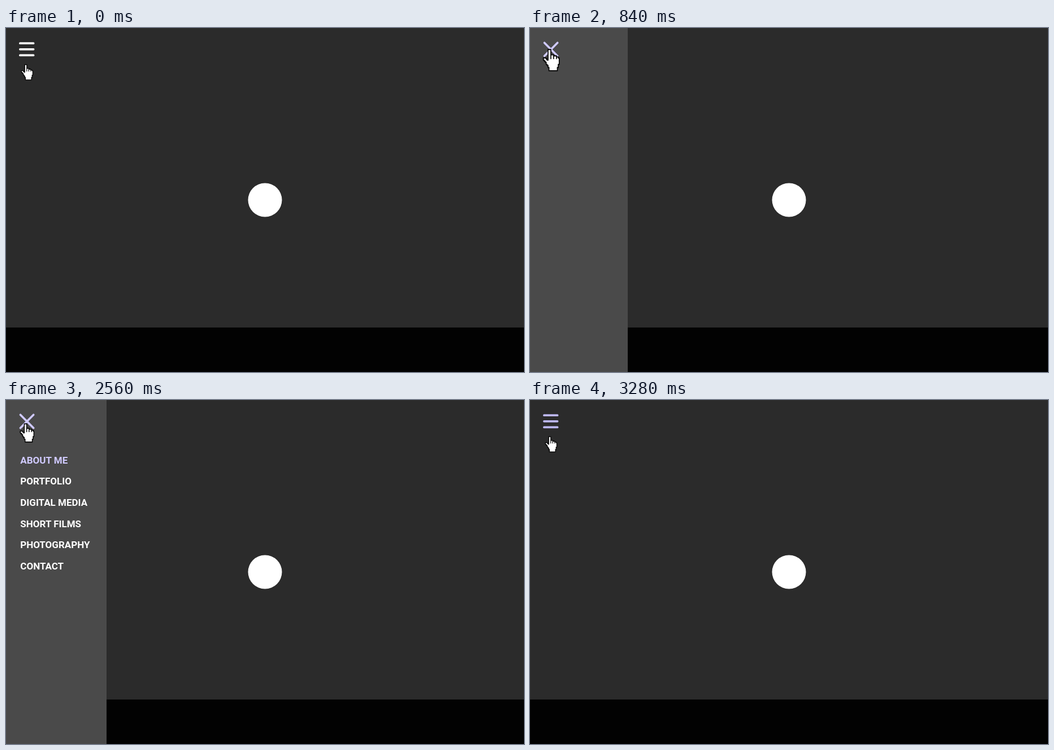
Write an HTML page that moves like this. It is 917x611 px and loops after 3.32 s.

```html
<!DOCTYPE html>
<html lang="en">
<head>
<meta charset="utf-8">
<title>Slide-out menu</title>
<style>
  html, body { margin: 0; width: 100%; height: 100%; overflow: hidden; background: #2b2b2b; }
  svg { display: block; width: 100vw; height: 100vh; }
  text { font: 600 17px Roboto, Inter, sans-serif; fill: #fff; }
</style>
</head>
<body>
<svg viewBox="0 0 917 611">
  <defs><clipPath id="clip"><rect id="clipRect" height="611"/></clipPath></defs>
  <rect width="917" height="611" fill="#2b2b2b"/>
  <rect y="532" width="917" height="79" fill="#020202"/>
  <circle cx="458.5" cy="305.5" r="30" fill="#fff"/>
  <rect id="panel" height="611" fill="#4a4a4a"/>
  <g id="menu" clip-path="url(#clip)"></g>
  <path id="icon" fill="none" stroke-width="3.7" stroke-linecap="round"/>
  <g id="cursor" stroke="#000" fill="#fff">
    <path d="M5 1H8V6H11V7H14V8H16V9H17V15H16V18H15V21H6V18H5V16H4V15H3V13H2V12H1V11H0V9H3V10H4V11H5Z"/>
    <path d="M8 6V10M11 7V10M14 8V10" fill="none"/>
  </g>
</svg>
<script>
const LOOP = 3320, STEP = 40;
const OPEN = 800, HOVER = 1240, CLOSED = 2840;
const WHITE = '#fff', LILAC = '#d0caff', LILAC_BAR = '#bdb8f4';
const BARS = [0, 1, 2].map(i => `M24.9 ${27.2 + 10.6 * i}h23.7`).join('');
const CROSS = 'M25.5 26.3l23.2 23.4m0 -23.4l-23.2 23.4';
const ITEMS = ['ABOUT ME', 'PORTFOLIO', 'DIGITAL MEDIA', 'SHORT FILMS', 'PHOTOGRAPHY', 'CONTACT'];

const $ = id => document.getElementById(id);
const phase = (t, from, to) => Math.min(1, Math.max(0, (t - from) / (to - from)));
const smooth = k => k * k * (3 - 2 * k);
const accelerate = k => k ** 1.7;
const ramp = (t, from, to) => smooth(phase(t, from, to));

// Eases up to 1, holds, then eases back to 0.
const pulse = (t, riseFrom, riseTo, fallFrom, fallTo) =>
  ramp(t, riseFrom, riseTo) - ramp(t, fallFrom, fallTo);

const labels = ITEMS.map((label, i) => {
  const node = document.createElementNS('http://www.w3.org/2000/svg', 'text');
  node.textContent = label;
  node.setAttribute('x', 25.3);
  node.setAttribute('y', 112.5 + 37.7 * i);
  return $('menu').appendChild(node);
});

// The open panel creeps wider and swells just before it snaps shut.
function panelWidth(t) {
  const full = 173 + 5 * phase(t, 840, 2560) + 14 * ramp(t, 2560, 2760);
  return full * accelerate(phase(t, 720, 840)) * (1 - accelerate(phase(t, 2772, CLOSED)));
}

function drawMenu(t) {
  const width = panelWidth(t);
  $('panel').setAttribute('width', width);
  $('clipRect').setAttribute('width', width);
  $('menu').setAttribute('opacity', pulse(t, 840, 1000, 2720, 2800));

  const active = pulse(t, HOVER, 1320, 1560, 1640);
  const about = labels[0].style;
  about.fill = t >= HOVER ? LILAC : WHITE;
  about.fontSize = 17 + 4 * active + 'px';
  about.letterSpacing = -2 * active + 'px';
}

function drawIcon(t) {
  const open = t >= OPEN && t < CLOSED;
  $('icon').setAttribute('d', open ? CROSS : BARS);
  $('icon').setAttribute('stroke', open ? LILAC : t < OPEN ? WHITE : LILAC_BAR);
}

function drawCursor(t) {
  const atIcon = pulse(t, 0, 560, 2320, 3280);
  const lift = pulse(t, 840, 1120, 2240, 2560);
  const atItem = pulse(t, 1120, 1400, 1640, 2200);
  const press = pulse(t, 600, 840, 840, 1120) + pulse(t, 2240, 2400, 2400, 2720);

  const x = 35 - 0.6 * atIcon + 18.6 * atItem;
  const y = 64.5 - 27.2 * atIcon - 7 * lift + 61 * atItem;
  const size = 1.18 * (1 + 0.4 * press);
  $('cursor').setAttribute('transform',
    `translate(${x} ${y}) scale(${size} ${size * 1.14}) translate(-6.5 -.5)`);
}

const start = performance.now();
function tick() {
  const elapsed = (performance.now() - start) % LOOP;
  const t = Math.floor(elapsed / STEP) * STEP;
  drawMenu(t);
  drawIcon(t);
  drawCursor(t);
  requestAnimationFrame(tick);
}
tick();
</script>
</body>
</html>
```
